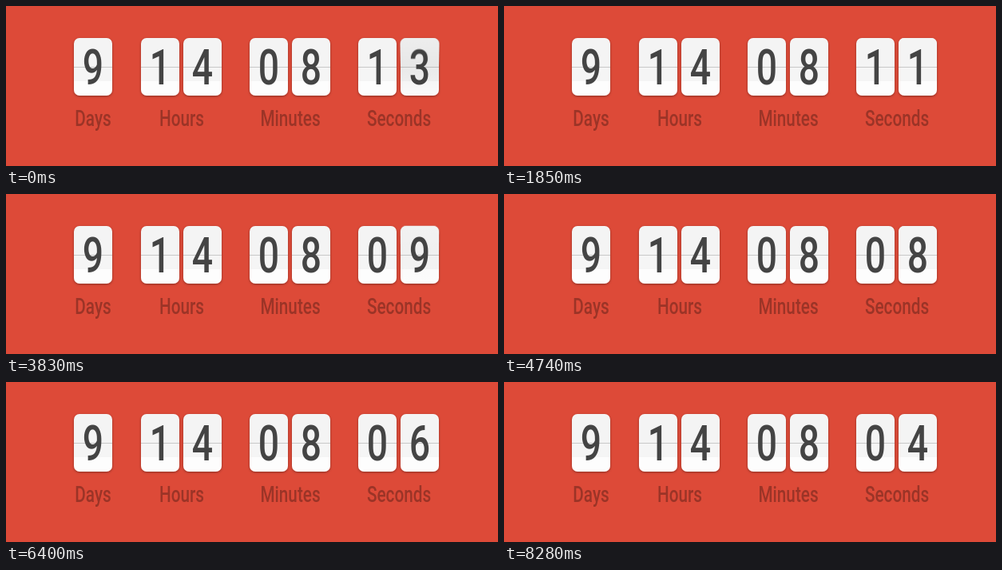
An HTML page for the animation above (8.54 s loop, 616 by 200 pixels).

```html
<!DOCTYPE html>
<html lang="en">
<head>
<meta charset="utf-8">
<title>Countdown</title>
<style>
  html, body { margin: 0; width: 100%; height: 100%; overflow: hidden; background: #dd4a38; }
  #stage { position: relative; width: 616px; height: 200px; overflow: hidden;
    font-family: Roboto, "Open Sans", sans-serif; font-weight: 500; }
  .label { position: absolute; top: 126px; width: 120px; margin-left: -60px; text-align: center;
    font-size: 28px; line-height: 30px; color: #9b3427; transform: scaleX(.74); }
  .card { position: absolute; top: 40px; width: 48px; height: 72px; border-radius: 7px;
    box-shadow: 0 1px 3px rgba(0, 0, 0, .38); perspective: 350px; }
  .half { position: absolute; left: 0; width: 48px; height: 36px; overflow: hidden; }
  .top { top: 0; border-radius: 7px 7px 0 0; background: #f4f4f4; transform-origin: 50% 100%; }
  .bottom { top: 36px; border-radius: 0 0 7px 7px; transform-origin: 50% 0;
    background: linear-gradient(#c8c8c8 1px, #f5f5f5 1px 18px, #fdfdfd 18px); }
  .digit { position: absolute; left: 0; top: 1px; width: 48px; text-align: center;
    font-size: 61px; line-height: 72px; color: #444; transform: scaleX(.76); }
  .bottom .digit { top: -35px; }
  .shade { position: absolute; inset: 0; opacity: 0;
    background: linear-gradient(rgba(0, 0, 0, .5), #000); }
  .bottom .shade { background: linear-gradient(#000, rgba(0, 0, 0, .25)); }
</style>
</head>
<body>
<div id="stage"></div>
<script>
const LOOP = 8540, STEP = 56.5, LAST = 12, FIRST_VALUE = 13;
const STARTS = [-113, 880, 1850, 2850, 3770, 4740, 5720, 6640, 7600];
const stage = document.getElementById('stage');

function add(parent, className, text = '') {
  const el = document.createElement('div');
  el.className = className;
  el.textContent = text;
  parent.append(el);
  return el;
}

function addHalf(card, side) {
  const el = add(card, 'half ' + side);
  return { el, digit: add(el, 'digit'), shade: add(el, 'shade') };
}

function addCard(x, value) {
  const el = add(stage, 'card');
  el.style.left = x + 'px';
  const card = {
    top: addHalf(el, 'top'),
    bottom: addHalf(el, 'bottom'),
    upper: addHalf(el, 'top'),
    lower: addHalf(el, 'bottom')
  };
  flip(card, value, value, 1);
  return card;
}

function paint(half, value, shade) {
  if (half.digit.textContent !== String(value)) half.digit.textContent = value;
  half.shade.style.opacity = shade;
}

function fold(half, angle, visible) {
  half.el.style.visibility = visible ? 'visible' : 'hidden';
  half.el.style.transform = `rotateX(${angle}deg)`;
}

// The old upper half falls to 90 degrees, then the new lower half lands.
function flip(card, from, to, progress) {
  const p = from === to ? 1 : Math.min(1, Math.max(0, progress));
  const angle = 90 * (1 - Math.cos(Math.PI * p));
  const lift = Math.sin(angle * Math.PI / 180);
  const falling = angle < 90;
  paint(card.top, to, falling ? .1 : .1 * lift);
  paint(card.bottom, p < 1 ? from : to, .18 * lift);
  paint(card.upper, from, .2 * lift);
  paint(card.lower, to, .16 * lift);
  fold(card.upper, -angle, falling);
  fold(card.lower, 180 - angle, !falling && p < 1);
}

for (const [x, text] of [[109, 'Days'], [219.5, 'Hours'], [356, 'Minutes'], [491.5, 'Seconds']]) {
  add(stage, 'label', text).style.left = x + 'px';
}
for (const [x, value] of [[85, 9], [169, 1], [222, 4], [305, 0], [358, 8]]) addCard(x, value);
const tens = addCard(441, 1);
const ones = addCard(494, 3);

function draw() {
  const time = performance.now() % LOOP;
  const i = STARTS.findLastIndex(start => time >= start);
  const from = FIRST_VALUE - i, to = from - 1;
  const step = Math.min(LAST, Math.floor((time - STARTS[i]) / STEP));
  flip(ones, from % 10, to % 10, (step + .35) / (LAST + .35));
  flip(tens, Math.floor(from / 10), Math.floor(to / 10), (step - 1) / (LAST - 1));
  requestAnimationFrame(draw);
}
draw();
</script>
</body>
</html>
```
